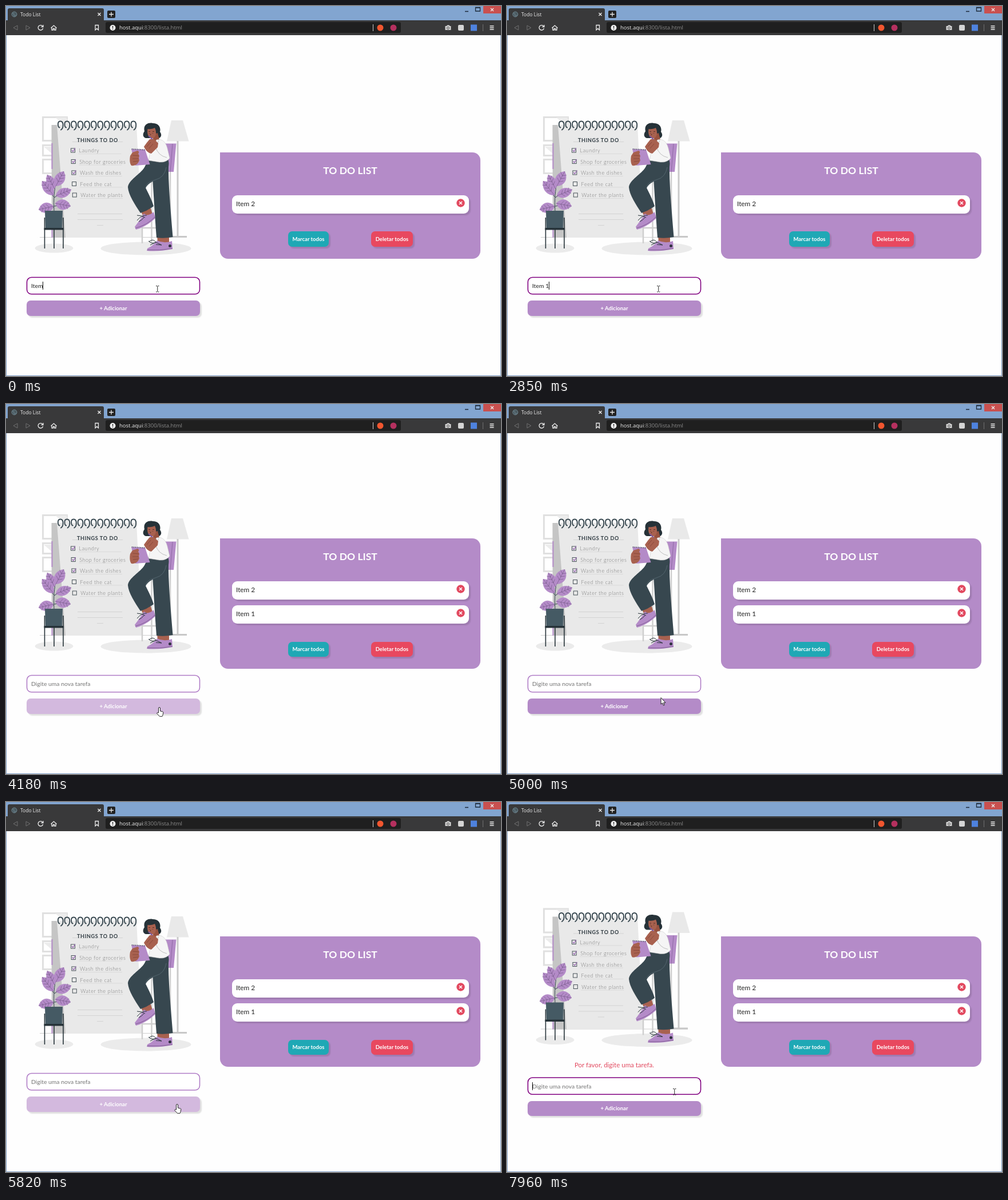
These frames come from a looping animation (865 px wide and 647 px high, 8 s). An HTML page:

```html
<!DOCTYPE html>
<html lang="pt">
<head>
<meta charset="utf-8">
<title>Todo List</title>
<style>
  html, body { margin: 0; width: 100%; height: 100%; overflow: hidden; background: #fefefe; }
  body { position: relative; font-family: Lato, sans-serif; }
  svg, div { position: absolute; box-sizing: border-box; }
  svg { left: 0; top: 0; }
  svg text { white-space: pre; }
  .ui { font-family: "Open Sans", sans-serif; }
  .btn { display: flex; align-items: center; justify-content: center; border-radius: 7px; color: #fff;
         font-weight: bold; font-size: 9.5px; box-shadow: 3px 3px 2px rgba(0,0,0,.12); }
  #panel { left: 374px; width: 455px; background: #b48bc8; border-radius: 0 14px 14px 14px; }
  #title { top: 19px; width: 100%; line-height: 26px; text-align: center; color: #fff; font-weight: bold; font-size: 17.5px; }
  .row { left: 21px; width: 413.5px; height: 32px; padding-left: 7px; line-height: 29px; font-size: 11.8px;
         color: #222; background: #fff; border-radius: 9px; box-shadow: 3px 3px 2px rgba(0,0,0,.12); }
  .row svg { left: 392px; top: 6px; }
  #error { left: 36px; top: 452px; width: 303px; line-height: 16px; text-align: center; font-size: 11.5px; color: #e2495f; }
  #text { left: 44px; height: 14px; line-height: 14px; font-size: 10.4px; white-space: pre; }
  #caret { width: 1px; height: 14px; background: #111; }
  #add { left: 36px; width: 303px; height: 26.5px; }
</style>
</head>
<body>
<svg width="865" height="647">
  <!-- browser window -->
  <path d="M.5 0V646.5H864.5V0" fill="none" stroke="#7f9fc8"/>
  <rect width="865" height="25" fill="#82a5d0"/>
  <path d="M3 25V7q0-3 3-3H168q3 0 3 3V25H865V51H0V25Z" fill="#39393a"/>
  <rect x="174" y="28" width="516" height="19" rx="3" fill="#1f1f1f"/>
  <rect x="177" y="8" width="14" height="13" rx="2" fill="#222"/>
  <rect x="834" width="31" height="13" fill="#c9504f"/>
  <g fill="none" stroke="#eee" stroke-width="1.3">
    <path d="M160.500 12l5 5m0-5l-5 5M180 14.500h8m-4-4v8M847 4l5 5m0-5l-5 5"/>
    <path d="M64 35.500a4.300 4.300 0 1 0 .6 3.500M65 33v3.500h-3.500M78.500 38.500l5-4.500 5 4.500M80 38v4h2.500v-2.500h2V42H87V38M156 33.500h5.500v8.500l-2.700-2.500-2.800 2.500z"/>
    <path d="M845.500 35h7m-7 3h7m-7 3h7"/>
    <path d="M641.500 32v12" stroke="#ccc" stroke-width="1"/>
    <path d="M20 34v8l-7-4zM35 34v8l7-4zM833.500 32v12" stroke="#707070" stroke-width="1"/>
    <path d="M802 9.500h6M820.500 2.500h8v6.500h-8zM820 3h9" stroke="#1d2a3a"/>
  </g>
  <g fill="none" stroke="#6f8791"><circle cx="14.500" cy="14.500" r="4.500" fill="#4a5960"/><path d="M11 12q4 1 3 4t4 0"/></g>
  <circle cx="186.500" cy="38" r="5" fill="#eee"/>
  <path d="M186.500 35v3.500m0 1.200v1.300" stroke="#222" stroke-width="1.400"/>
  <circle cx="654" cy="38" r="5.500" fill="#f1562f"/>
  <circle cx="677" cy="38" r="5.500" fill="#b5305f"/>
  <path d="M767.500 35h2.500l1-1.500h3.500l1 1.500h2v7h-10z" fill="#d2d2d2"/>
  <circle cx="772.500" cy="38.500" r="2" fill="none" stroke="#444"/>
  <rect x="790" y="33" width="10" height="10" rx="2" fill="#d5d5d5"/>
  <rect x="812" y="32.500" width="11" height="11" fill="#4e82de"/>
  <text class="ui" x="25" y="17.500" font-size="8.500" fill="#eee">Todo List</text>
  <text class="ui" x="198" y="41.200" font-size="9.500" fill="#eee">host.aqui<tspan fill="#8d8d8d">:8300/lista.html</tspan></text>

  <g id="art">
    <g fill="#fff" stroke="#e0e0e0" stroke-width="3">
      <path d="M64.500 194.500h42v41h-42zM64.500 243.500h42v18h-42zM64.500 268.500h42v24h-42z"/>
      <path d="M86 195l20 16v-16zM66 246l14 12v-12z" fill="#ececec" stroke="none"/>
    </g>
    <g fill="#ebebeb"><ellipse cx="84" cy="423.500" rx="33.500" ry="8"/><ellipse cx="244.500" cy="424" rx="79" ry="11.500"/></g>
    <path d="M59 404.500H316" stroke="#cfcfcf"/>
    <path d="M79.500 208H92L106 405H80z" fill="#c5c5c5"/>
    <path d="M80.500 240v45m0 80v40" stroke="#b48bc8" stroke-width="2"/>
    <path d="M89 208H228L238 405H104z" fill="#e9e9e9"/>
    <path d="M116 237.500h88M125 363.500h78M125 373.500h79M159 383.500h11" stroke="#d3d3d3"/>
    <text x="124" y="238" font-size="9" font-weight="bold" letter-spacing=".65" fill="#303b42">THINGS TO DO</text>
    <g id="notes" font-size="9" font-weight="300" letter-spacing=".6" fill="#777"></g>
    <g id="coils" fill="none" stroke="#37474f" stroke-width="1.900" stroke-linecap="round"></g>

    <!-- plant -->
    <path d="M84 360C83 335 84 325 88 305M84 350L100 348M84 352L70 351M84 335L100 326M84 334L70 320" fill="none" stroke="#37474f"/>
    <g id="leaves" fill="#b48bc8" stroke="#5e4870" stroke-width=".5"></g>
    <path d="M68 358H99L98 389H69z" fill="#455a64"/>
    <path d="M66.500 388H101v3.500H66.500z" fill="#263238"/>
    <path d="M67.500 370V424M84 390V424M100 370V424" stroke="#263238" stroke-width="1.600"/>

    <!-- lamp and chair -->
    <path d="M289 200H309L319.500 236.500H281z" fill="#e9e9e9"/>
    <path d="M300 236V403" stroke="#cacaca" stroke-width="3"/>
    <path d="M283 403.500H316" stroke="#c8c8c8" stroke-width="3"/>
    <path d="M254.500 280V413M238 352V415M287 288V403M238 388H287" fill="none" stroke="#cfcfcf" stroke-width="2.500"/>
    <path d="M277 240.500H297.500L293 290H282z" fill="#b48bc8"/>
    <path d="M291 241L287 290" stroke="#8f6aa5"/>

    <!-- woman -->
    <path d="M234 356L251 348 256 364 241 369zM264 400H285V415H265z" fill="#a8614f"/>
    <path d="M241 363Q249 369 258 360L261 371Q245 386 227 391L225 386Q233 376 241 363zM247 424Q258 419 264 410 276 416 290 411L291 425Q266 430 246 428z" fill="#b48bc8"/>
    <path d="M226 388.500Q247 383 260 369M247 426.500Q268 428 291 424" fill="none" stroke="#76558a" stroke-width=".8"/>
    <path d="M229 366q8 0 14 4m-14 5q8-10 17-9m-14 11q5-2 9-7M250 412q7-6 12 1-7 4-13-2m3 7l10-5 10 5-10-1" fill="none" stroke="#263238"/>
    <circle cx="286.500" cy="419.500" r="2.500" fill="#2f3140"/>
    <path d="M256 275L284 271C283 310 288 360 291.500 404Q276 407 263 405C260 365 258 330 256 300z" fill="#37474f"/>
    <path d="M249 268H283C288 280 280 296 268 302 255 306 247 312 244 318 250 330 255 340 258 350Q247 358 235 362C225 347 214 330 213 317 214 304 235 294 242 282z" fill="#37474f"/>
    <path d="M280 282Q277 300 261 304T244 318" fill="none" stroke="#5a6b74" stroke-width=".8"/>
    <path d="M242 219C239 207 249 203 257 205 267 205 271 213 269 220 274 226 270 233 262 231L244 231C238 229 239 223 242 219z" fill="#263238"/>
    <path d="M256 225L265 222 269 238 258 240z" fill="#98523f"/>
    <path d="M247.500 215Q254 216 260 213C264 221 262 231 255.500 231.500 249 231 246 224 247.500 215z" fill="#a8614f"/>
    <path d="M249 219.500h3m4 0h3m-9 3h1m5 0h1m-4 1l-1 2.500" stroke="#46271f" stroke-width=".8" fill="none"/>
    <path d="M263 234C274 231 280 240 282 249L286 266Q280 274 268 273L249 270Q252 250 263 234z" fill="#f5f5f5" stroke="#c9c9c9" stroke-width=".6"/>
    <path d="M261 246Q266 262 281 265M267 235q-2 6-6 9" fill="none" stroke="#a7a7a7" stroke-width=".7"/>
    <path d="M241 246L246 239 251 233Q257 231 261 235L266 240 265 247 254 258Q246 257 241 246z" fill="#a8614f"/>
    <path d="M246 246l7-8m-3 11l7-8" stroke="#7d4033" stroke-width=".7"/>
    <path d="M249 227L256 233" stroke="#7956a0" stroke-width="2"/>
    <path d="M219 250L243 251 251.500 277 226 279z" fill="#b48bc8"/>
    <path d="M220 250L243 251.500" stroke="#37474f" stroke-width="2" stroke-dasharray="1 2"/>
    <path d="M217 262L221 256 230 253Q234 255 231 258L233 262 232 266 233 270 231 274Q227 280 219 279 215 274 217 262z" fill="#a8614f"/>
    <path d="M221 261l11 1m-11 5h11m-10 5l9-1" stroke="#7d4033" stroke-width=".7"/>
  </g>
</svg>

<div id="panel">
  <div id="title">TO DO LIST</div>
  <div class="row" style="top:75px">Item 2</div>
  <div class="row" id="second" style="top:117px">Item 1</div>
  <div class="btn" style="left:119px;bottom:21px;width:71px;height:26.500px;background:#1fa8b5">Marcar todos</div>
  <div class="btn" style="left:264px;bottom:21px;width:73px;height:26.500px;background:#e8485f">Deletar todos</div>
</div>
<div id="error">Por favor, digite uma tarefa.</div>
<svg width="865" height="647">
  <rect id="field" x="36.500" width="302" height="29.300" rx="8" fill="#fff" stroke-width="1.600"/>
</svg>
<div id="text"></div>
<div id="caret"></div>
<div id="add" class="btn">+ Adicionar</div>

<svg width="865" height="647">
  <g id="pointer" stroke="#111" stroke-width=".9" stroke-linejoin="round">
    <path id="beam" fill="none" d="M0 .5H2.200M3.300 .5H5.500M2.750 1V10.500M0 11H2.200M3.300 11H5.500"/>
    <path id="hand" fill="#fff" d="M3.500 10V2a1.500 1.500 0 0 1 3 0V7l4 .8q1.500 .4 1.300 2l-.8 4q-.3 1.500-1 2.500H5.500L1 11.500q-.8-1.500 .6-1.900z"/>
    <path id="arrow" fill="#fff" d="M1 .5V12L3.600 9.800 5.400 14 7.200 13.300 5.500 9.300H9z"/>
  </g>
</svg>

<script>
const $ = id => document.getElementById(id);
const LOOP = 8000;

// Each entry changes part of the state from its time on.
const timeline = [
  [0, { text: 'Item', caret: 63.5, selected: false, focus: true, hover: 0, added: false, error: false,
        pointer: ['beam', 262, 489] }],
  [580, { caret: 0 }],
  [990, { text: 'Item1', caret: 70 }],
  [1570, { caret: 0 }],
  [1970, { selected: true }],
  [2120, { selected: false, text: 'Item', caret: 63.5 }],
  [2550, { caret: 0 }],
  [2710, { caret: 66.5 }],
  [2850, { text: 'Item 1', caret: 73 }],
  [3410, { caret: 0, hover: .5, pointer: ['hand', 267, 516] }],
  [3530, { hover: 1, pointer: ['hand', 265, 525] }],
  [3650, { pointer: ['hand', 263, 530] }],
  [3930, { focus: false }],
  [4180, { text: '', added: true }],
  [4860, { pointer: ['hand', 268, 514] }],
  [5000, { hover: 0, pointer: ['arrow', 268, 513] }],
  [5240, { hover: 1, pointer: ['hand', 265, 526] }],
  [5390, { pointer: ['hand', 263, 531] }],
  [5510, { hover: 0, pointer: ['arrow', 282, 583] }],
  [5660, { pointer: ['arrow', 300, 577] }],
  [5820, { hover: 1, pointer: ['hand', 294, 528] }],
  [5970, { pointer: ['hand', 294, 527] }],
  [6530, { error: true }],
  [7250, { pointer: ['arrow', 296, 515] }],
  [7400, { hover: 0, pointer: ['beam', 290, 501] }],
  [7960, { focus: true, caret: 44 }],
];

const notes = ['Laundry', 'Shop for groceries', 'Wash the dishes', 'Feed the cat', 'Water the plants'];
$('notes').innerHTML = notes.map((note, i) => {
  const x = 113.5 + i * .7, y = 249 + i * 19.5;
  const tick = i < 3 ? `<path d="M${x + 1.5} ${y + 3}l2 2.500 4-6" fill="none" stroke="#9867b2" stroke-width="1.300"/>` : '';
  return `<rect x="${x}" y="${y}" width="7" height="7" fill="none" stroke="#4a545a"/>${tick}
    <path d="M${x + 13} ${y + 9.5}h75" stroke="#d9d9d9"/><text x="${x + 14}" y="${y + 7}">${note}</text>`;
}).join('');

$('coils').innerHTML = Array.from({ length: 12 }, (_, i) =>
  `<path d="M${96 + i * 11.6} 216.500c5-3 5-15-1-15s-4.500 10-1.500 11"/>`).join('');

function leaf(x, y, tipX, tipY, width) {
  const dx = tipX - x, dy = tipY - y, k = width / Math.hypot(dx, dy);
  const at = (along, side) => `${x + dx * along - dy * k * side} ${y + dy * along + dx * k * side} `;
  let veins = `M${at(0, 0)}L${at(1, 0)}`;
  for (const p of [.3, .5, .7]) for (const side of [-.5, .5]) veins += `M${at(p, 0)}L${at(p + .15, side)}`;
  return `<path stroke="none" d="M${at(0, 0)}C${at(.25, 1)}${at(.7, 1)}${at(1, 0)}C${at(.7, -1)}${at(.25, -1)}${at(0, 0)}"/>
    <path d="${veins}"/>`;
}
$('leaves').innerHTML = leaf(87, 315, 101, 289, 12) + leaf(85, 320, 72, 295, 10) + leaf(83, 331, 63, 306, 11) +
  leaf(87, 332, 114, 321, 11) + leaf(83, 350, 57, 356, 12) + leaf(86, 345, 113, 350, 12);

for (const row of document.querySelectorAll('.row'))
  row.insertAdjacentHTML('beforeend', `<svg width="15" height="15"><circle cx="7.500" cy="7.500" r="7.200" fill="#e2495f"/>
    <path d="M5 5l5 5m0-5l-5 5" stroke="#fff" stroke-width="1.500"/></svg>`);

function render(time) {
  const s = Object.assign({}, ...timeline.filter(([start]) => start <= time).map(([, change]) => change));
  const shift = s.error ? 7.5 : 0;
  const px = (id, prop, value) => $(id).style[prop] = value + 'px';
  const show = (id, on) => $(id).style.display = on ? '' : 'none';

  $('art').setAttribute('transform', `translate(0 ${-shift})`);
  show('error', s.error);
  px('panel', 'top', s.added ? 235 : 256);
  px('panel', 'height', s.added ? 228 : 185.5);
  show('second', s.added);

  $('field').setAttribute('y', 474.5 + shift);
  $('field').setAttribute('stroke', s.focus ? '#800080' : '#b07cc6');
  px('text', 'top', 482 + shift);
  $('text').textContent = s.text || 'Digite uma nova tarefa';
  $('text').style.color = s.selected ? '#fff' : s.text ? '#222' : '#757575';
  $('text').style.background = s.selected ? '#3297fd' : 'none';
  show('caret', s.caret);
  px('caret', 'left', s.caret);
  px('caret', 'top', 482 + shift);

  px('add', 'top', 515 + shift);
  $('add').style.background = `rgb(${180 + 31 * s.hover},${139 + 46 * s.hover},${200 + 22 * s.hover})`;

  const [kind, x, y] = s.pointer;
  for (const id of ['beam', 'hand', 'arrow']) show(id, id === kind);
  $('pointer').setAttribute('transform', `translate(${x} ${y})`);
}

(function frame() {
  render(performance.now() % LOOP);
  requestAnimationFrame(frame);
})();
</script>
</body>
</html>
```
